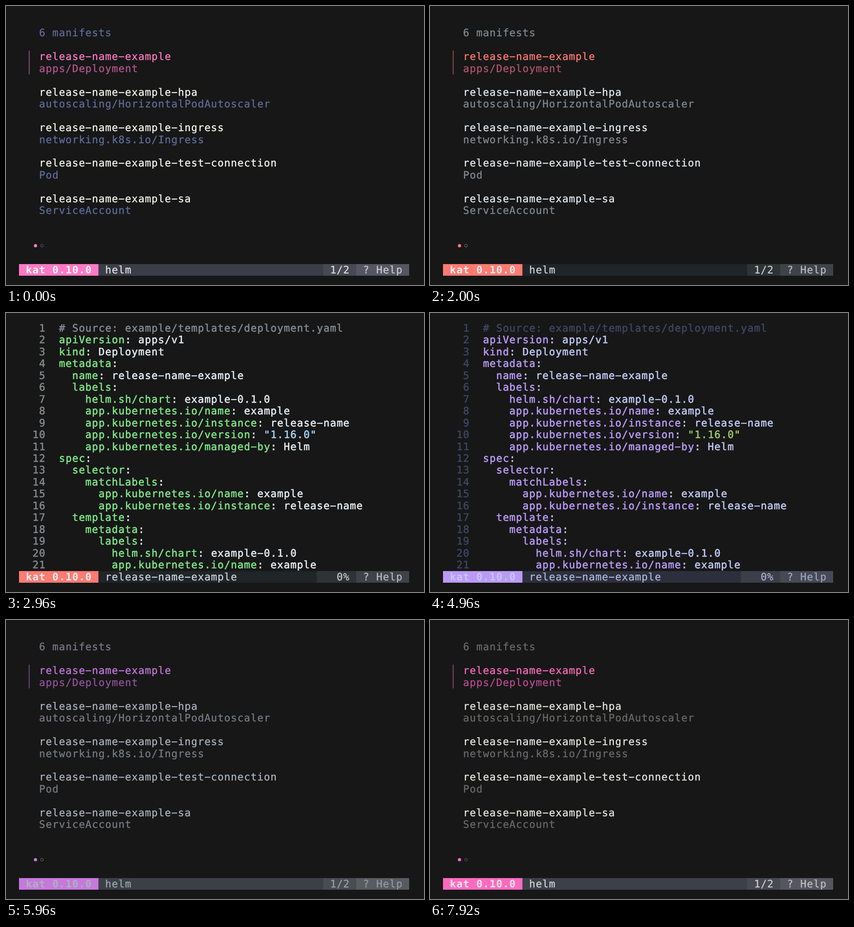
An HTML page for the animation above (8 s loop, 900x600 px).

```html
<!DOCTYPE html>
<html lang="en">
<head>
<meta charset="utf-8">
<title>kat themes</title>
<style>
  html, body { margin: 0; width: 100%; height: 100%; overflow: hidden; background: #171717; }
  #stage {
    position: relative; width: 900px; height: 600px; overflow: hidden;
    --cell: calc(840px / 59); --row: calc(560px / 22);
    font: 22px/var(--row) "DejaVu Sans Mono", monospace;
    letter-spacing: .992px; text-rendering: geometricPrecision;
    font-variant-ligatures: none; white-space: pre; color: var(--text);
    -webkit-text-stroke: .35px;
  }
  #code { -webkit-text-stroke: .6px; }
  .cells {
    position: absolute; box-sizing: border-box; height: var(--row); padding: 1px 0 0 .5px;
    left: calc(28px + var(--x) * var(--cell)); top: calc(20px + var(--y) * var(--row));
  }
  .accent { color: var(--accent); }
  .dim { color: var(--dim); }
  .subtle { color: var(--subtle); }
  .comment { color: var(--comment); }
  .key { color: var(--key); }
  .string { color: var(--string); }
  .quote { color: var(--quote); }
  .bar, .badge, .segment, .help { width: calc(var(--w) * var(--cell)); -webkit-text-stroke: .3px; }
  .bar { background: var(--bar); color: color-mix(in srgb, var(--text) 90%, var(--bar)); }
  .badge { background: var(--accent); font-weight: bold; -webkit-text-stroke: 0; }
  .segment { background: var(--segment); color: color-mix(in srgb, var(--text) 84%, var(--segment)); }
  .help { background: var(--help); color: color-mix(in srgb, var(--text) 72%, var(--help)); }
  .marker { position: absolute; left: 49px; top: 96px; width: 1px; height: 51px; background: var(--accent); transform: translateX(.4px); }
  .dot { position: absolute; box-sizing: border-box; border-radius: 50%; width: 7px; height: 7px; top: 512px; }
  .dot.on { left: 60px; background: var(--accent); }
  .dot.off { left: 74px; border: 1px solid var(--subtle); }
</style>
</head>
<body>
<div id="stage">
  <div id="list"><div class="marker"></div><div class="dot on"></div><div class="dot off"></div></div>
  <div id="code"></div>
</div>
<script>
const stage = document.getElementById('stage');
const list = document.getElementById('list');
const code = document.getElementById('code');

const colorNames = ['text', 'accent', 'dim', 'subtle', 'bar', 'segment', 'help', 'comment', 'key', 'string', 'quote'];
const themes = [
  '#f8f8f2 #ff79c6 #b3568d #5f6c9c #3b3e49 #474954 #555663 #6455a8 #ff80d0 #a4ec9b #dfe9a6',
  '#e6edf3 #ff7b72 #b0556e #828990 #1f2528 #2e3336 #3f4349 #828990 #7ee787 #a5d6ff #a5d6ff',
  '#c0caf5 #bb9af7 #8069aa #3e4561 #2e2f3c #3c3e48 #474955 #3e4561 #bb9af7 #9ece6a #9ece6a',
  '#abb2bf #c678dd #8f539c #777b82 #3b4048 #484c54 #585c61 #777b82 #e06c75 #98c379 #98c379',
  '#e8e8e4 #ff6ac1 #b84b8d #69696d #3c404a #474953 #565662 #69696d #ff6ac1 #5af78e #5af78e',
].map(colors => colors.split(' '));

// The minus glyph has the wide hyphen shape of the terminal font.
const wideHyphens = text => text.replaceAll('-', '\u2212');

function put(parent, text, x, y, className = '') {
  const el = document.createElement('div');
  el.className = 'cells ' + className;
  el.textContent = wideHyphens(text);
  for (const [name, value] of Object.entries({ x, y, w: text.length })) el.style.setProperty('--' + name, value);
  parent.append(el);
  return x + text.length;
}

function statusBar(parent, title, position) {
  const right = 51 - position.length;
  let x = put(parent, ' kat 0.10.0 ', 0, 21, 'badge');
  put(parent, (' ' + title).padEnd(right - x), x, 21, 'bar');
  x = put(parent, position, right, 21, 'segment');
  put(parent, ' ? Help ', x, 21, 'help');
}

const manifests = [
  ['', 'apps/Deployment'],
  ['-hpa', 'autoscaling/HorizontalPodAutoscaler'],
  ['-ingress', 'networking.k8s.io/Ingress'],
  ['-test-connection', 'Pod'],
  ['-sa', 'ServiceAccount'],
];
put(list, '6 manifests', 3, 1, 'subtle');
manifests.forEach(([suffix, kind], i) => {
  put(list, 'release-name-example' + suffix, 3, 3 + i * 3, i ? '' : 'accent');
  put(list, kind, 3, 4 + i * 3, i ? 'subtle' : 'dim');
});
statusBar(list, 'helm', ' 1/2 ');

const yaml = `# Source: example/templates/deployment.yaml
apiVersion: apps/v1
kind: Deployment
metadata:
  name: release-name-example
  labels:
    helm.sh/chart: example-0.1.0
    app.kubernetes.io/name: example
    app.kubernetes.io/instance: release-name
    app.kubernetes.io/version: "1.16.0"
    app.kubernetes.io/managed-by: Helm
spec:
  selector:
    matchLabels:
      app.kubernetes.io/name: example
      app.kubernetes.io/instance: release-name
  template:
    metadata:
      labels:
        helm.sh/chart: example-0.1.0
        app.kubernetes.io/name: example`;

yaml.split('\n').forEach((line, y) => {
  put(code, String(y + 1).padStart(2), 2, y, 'subtle');
  if (line.startsWith('#')) return put(code, line, 6, y, 'comment');
  const [, indent, key, value] = line.match(/^( *)([^:]+)(:.*)$/);
  let x = put(code, key, 6 + indent.length, y, 'key');
  value.split(/(")/).forEach((part, i) => {
    if (part) x = put(code, part, x, y, i % 2 ? 'quote' : i === 2 ? 'string' : '');
  });
});
statusBar(code, 'release-name-example', '   0% ');

// Views alternate between list and code; each pair uses the next theme.
const starts = [0, 1000, 2000, 2960, 3960, 4960, 5960, 6920, 7920];
const loop = 8000;
let shown = -1;

function show(view) {
  if (view === shown) return;
  shown = view;
  const colors = themes[view >> 1];
  colorNames.forEach((name, i) => stage.style.setProperty('--' + name, colors[i]));
  list.hidden = view % 2 === 1;
  code.hidden = !list.hidden;
}

function frame() {
  const time = performance.now() % loop;
  show(starts.filter(start => start <= time).length - 1);
  requestAnimationFrame(frame);
}
frame();
</script>
</body>
</html>
```
